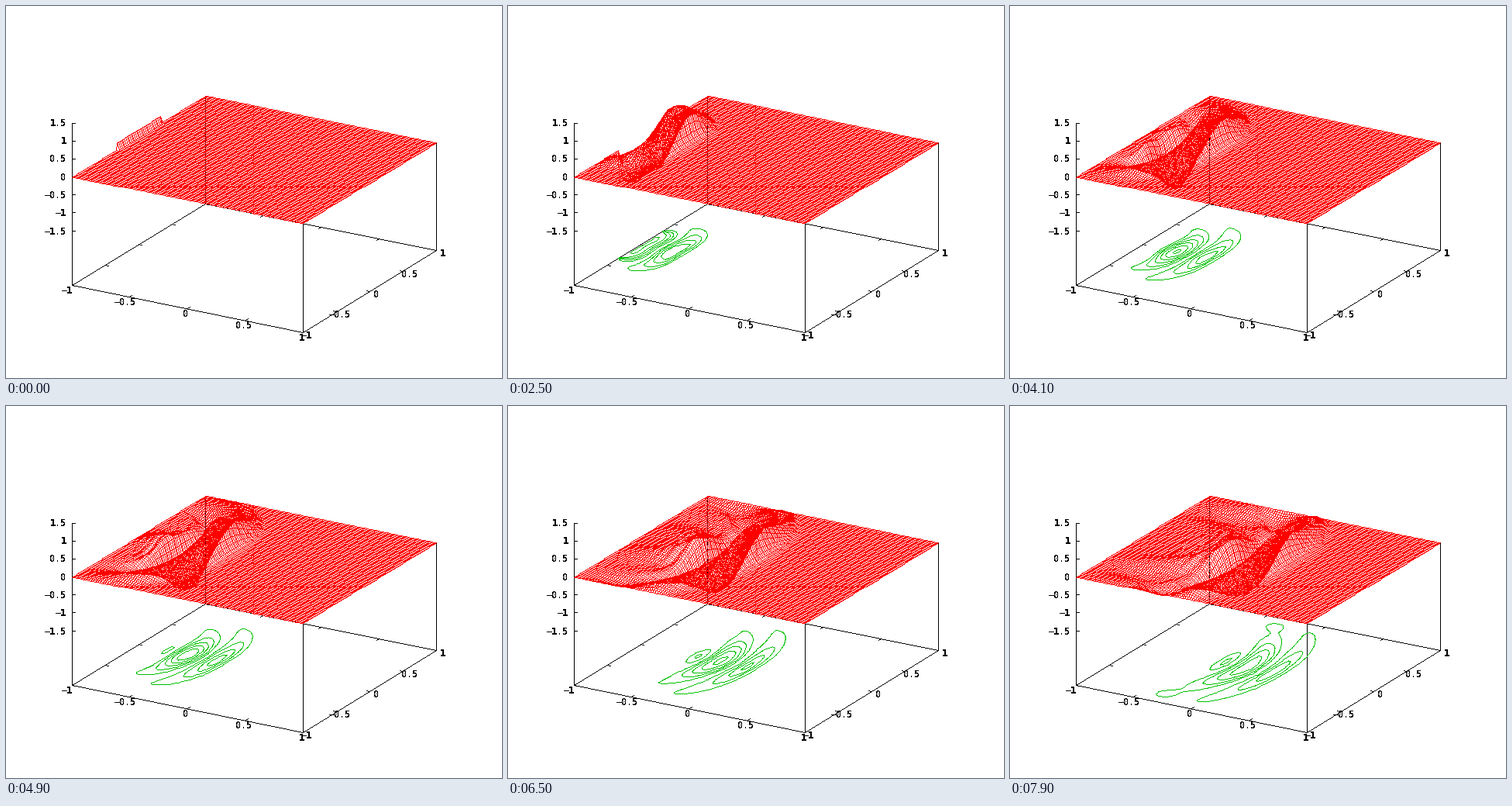
Animation, 640 px wide and 480 px high, one loop 8 s. Source, as a matplotlib script:

```python
import numpy as np
import matplotlib.pyplot as plt
from matplotlib.animation import FuncAnimation

W, H = 640, 480
FRAMES, INTERVAL = 80, 100
N = 100                     # cells per side
STEPS = 2                   # solver steps per frame
DT = 1 / 64 / STEPS         # wave speed 1
OMEGA = 4 * np.pi
SLIT = 1 / 3                # half width of the driven edge
LEVELS = [s * v for v in (0.2, 0.4, 0.6, 0.8, 1.0, 1.2) for s in (1, -1)]
RED, GREEN, BLACK = (255, 0, 0), (0, 192, 0), (0, 0, 0)

MIDDLE = np.array([320, 233])
SCALE = np.array([604, 425]) * 2 / 7
TILT, TURN = np.radians([60, 30])

plt.rcParams["text.antialiased"] = False

axis = np.linspace(-1, 1, N + 1)
X, Y = np.meshgrid(axis, axis, indexing="ij")


def project(x, y, z):
    """Map a 3D point to stage pixels; z runs from -3 to 1.5."""
    z = (z + 3) / 2.25 - 1
    across = np.cos(TURN) * x + np.sin(TURN) * y
    depth = np.sin(TURN) * x - np.cos(TURN) * y
    down = np.cos(TILT) * depth - np.sin(TILT) * z
    return MIDDLE + SCALE * np.stack(np.broadcast_arrays(across, down), -1)


def snap(p):
    return MIDDLE + np.trunc(np.reshape(p, (-1, 2)) - MIDDLE)


def draw_lines(img, start, end, color):
    """Plot one-pixel lines without smoothing."""
    a, b = snap(start), snap(end)
    if not len(a):
        return
    n = np.maximum(np.abs(b - a).max(axis=1), 1)
    k = np.arange(int(n.max()) + 1)
    f = np.minimum(k[None, :] / n[:, None], 1)[..., None]
    p = np.floor(a[:, None] + (b - a)[:, None] * f + 0.5).astype(int)
    px, py = p[..., 0].ravel(), p[..., 1].ravel()
    ok = (px >= 0) & (px < W) & (py >= 0) & (py < H)
    img[py[ok], px[ok]] = color


def simulate():
    """Wave equation with fixed edges, one sine cycle fed in at x = -1."""
    u = np.zeros((N + 1, N + 1))
    old = u.copy()
    slit = np.abs(axis) < SLIT
    c2 = (DT * N / 2) ** 2
    fields = []
    for k in range(1, FRAMES * STEPS + 1):
        new = np.zeros_like(u)
        lap = (u[2:, 1:-1] + u[:-2, 1:-1] + u[1:-1, 2:] + u[1:-1, :-2]
               - 4 * u[1:-1, 1:-1])
        new[1:-1, 1:-1] = 2 * u[1:-1, 1:-1] - old[1:-1, 1:-1] + c2 * lap
        t = k * DT
        if t < 2 * np.pi / OMEGA:
            new[0, slit] = np.sin(OMEGA * t)
        old, u = u, new
        if k % STEPS == 0:
            fields.append(u)
    return fields


def corners(g):
    """Vertices of the two triangles in every cell."""
    a, b, c, d = g[:-1, :-1], g[1:, :-1], g[1:, 1:], g[:-1, 1:]
    tri = [np.stack(pair) for pair in ((a, a), (b, c), (c, d))]
    return [v.reshape(-1, *g.shape[2:]) for v in tri]


floor_pts = corners(project(X, Y, -3.0))


def draw_contours(img, u):
    z = corners(u)
    for level in LEVELS:
        if not u.min() < level < u.max():
            continue
        up = [v > level for v in z]
        for i in range(3):
            j, k = (i + 1) % 3, (i + 2) % 3
            m = (up[i] != up[j]) & (up[j] == up[k])
            ends = []
            for q in (j, k):
                f = (level - z[i][m]) / (z[q][m] - z[i][m])
                p0, p1 = floor_pts[i][m], floor_pts[q][m]
                ends.append(p0 + (p1 - p0) * f[:, None])
            draw_lines(img, *ends, GREEN)


def draw_box():
    img = np.full((H, W, 3), 255, np.uint8)

    def line(p, q):
        draw_lines(img, p, q, BLACK)

    ring = [(-1, -1), (1, -1), (1, 1), (-1, 1)]
    for i, (x, y) in enumerate(ring):
        base = project(x, y, -3)
        line(base, project(*ring[(i + 1) % 4], -3))
        line(base, project(x, y, 1.5 if i == 0 else 0))

    along_x, along_y = np.array([4, 1]), np.array([3, -2])
    for v in np.arange(-1, 1.1, 0.5):
        for side in (-1, 1):
            p = project(v, side, -3)
            line(p, p - side * along_y)
            p = project(side, v, -3)
            line(p, p - side * along_x)
    for v in np.arange(-1.5, 1.6, 0.5):
        p = project(-1, -1, v)
        line(p, p + [4, 0])
    return img


fig = plt.figure(figsize=(W / 100, H / 100), dpi=100, facecolor="white")
ax = fig.add_axes([0, 0, 1, 1])
ax.axis("off")

box = draw_box()
fields = simulate()
view = ax.imshow(box, interpolation="nearest", aspect="auto")


def label(v, x, y, ha="center"):
    ax.text(x, y + 4, f"{v:g}".replace("-", "\u2212"), ha=ha, va="baseline",
            color="black", family="DejaVu Sans Mono", weight="bold", size=8.4)


for v in np.arange(-1, 1.1, 0.5):
    shift = -3.5 if v < 0 else 0
    x, y = project(v, -1, -3)
    label(v, x - 2.5 + shift, y + 6)
    x, y = project(1, v, -3)
    label(v, x + 7.5 + shift, y + 3)
for v in np.arange(-1.5, 1.6, 0.5):
    label(v, 77, project(-1, -1, v)[1], ha="right")


def update(i):
    u = fields[i]
    img = box.copy()
    p = project(X, Y, u)
    draw_lines(img, p[:-1], p[1:], RED)
    draw_lines(img, p[:, :-1], p[:, 1:], RED)
    draw_contours(img, u)
    view.set_data(img)
    return [view]


anim = FuncAnimation(fig, update, frames=FRAMES, interval=INTERVAL,
                     repeat=True, repeat_delay=0, blit=False)
plt.show()
```
